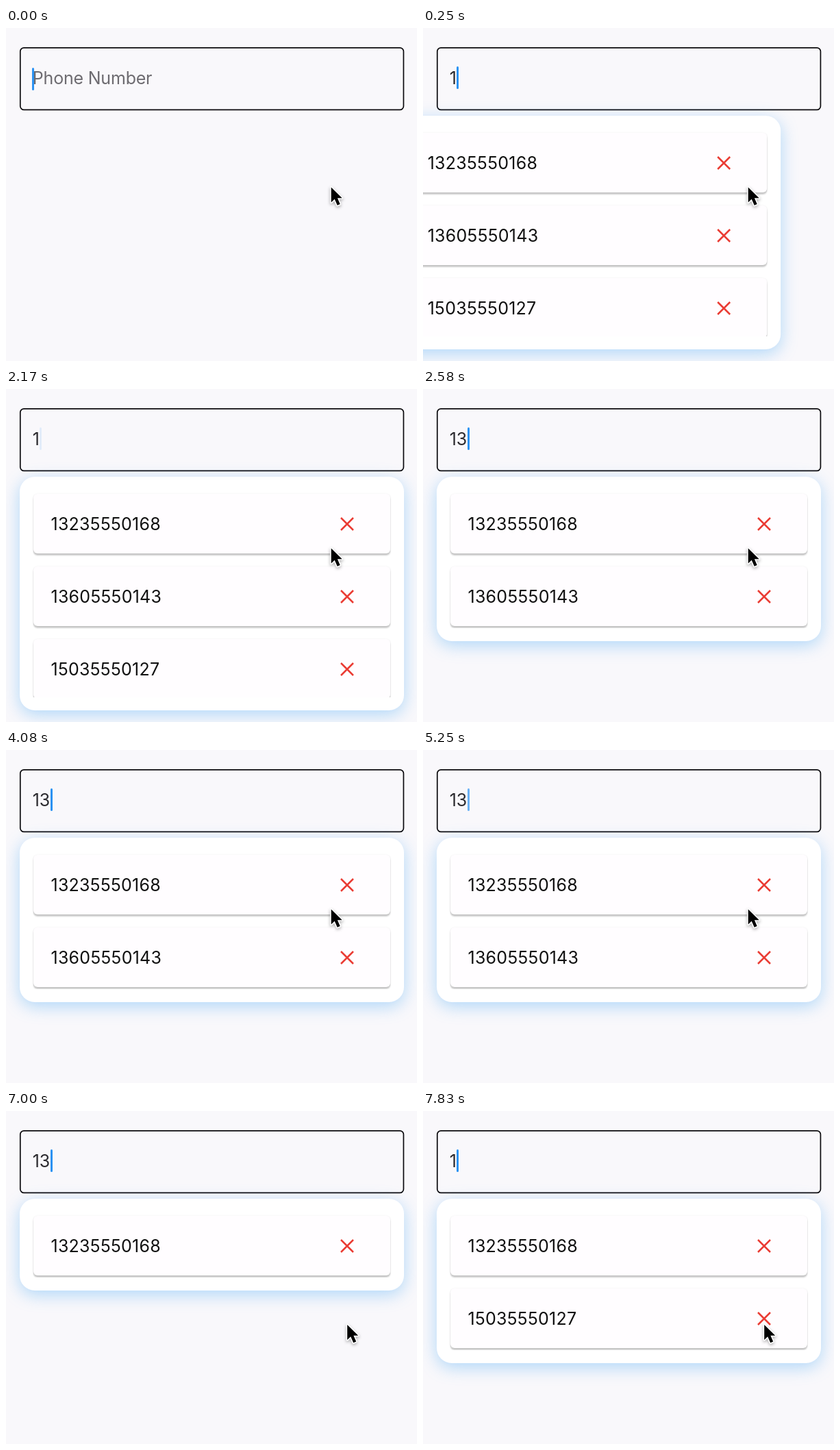
Recreate the animation shown at these times as an HTML page. Size 600 by 486 pixels, loop 8 s.

```html
<!DOCTYPE html>
<html lang="en">
<head>
<meta charset="utf-8">
<title>Phone number suggestions</title>
<style>
  html, body { margin: 0; width: 100%; height: 100%; overflow: hidden; background: #f9f8fb; }
  body { position: relative; font: 25px/30px Inter, sans-serif; }
  body > *, .list, .card * { position: absolute; }
  svg { overflow: visible; }
  #text { left: 38.8px; top: 58px; white-space: pre; letter-spacing: -.2px; }
  #caret { width: 3px; height: 33px; border-radius: 1.5px; background: #2b92f2; }
  #panel {
    left: 20px; top: 128px; width: 561px; border-radius: 22px; background: #fff;
    box-shadow: 0 6px 24px rgba(66, 165, 245, .4);
  }
  .list { inset: 19px; overflow: hidden; }
  .card {
    position: relative; margin: 6px 1px 19px; height: 87px; border-radius: 6px;
    background: #fffdff; color: #111;
    box-shadow: 0 3px 2px rgba(0, 0, 0, .17), 0 1px 3px rgba(0, 0, 0, .14);
  }
  .card span { left: 25.5px; top: 29px; letter-spacing: .25px; }
  .card svg { left: 449px; top: 34.5px; }
  #mouse { left: 0; top: 0; filter: drop-shadow(0 2px 2px rgba(0, 0, 0, .3)); }
</style>
</head>
<body>
<svg width="600" height="486">
  <rect x="20.8" y="28.8" width="559.6" height="90.6" rx="5.5" fill="none" stroke="#0c0b0e" stroke-width="1.7"/>
</svg>
<div id="text"></div>
<div id="caret"></div>
<div id="panel"><div class="list"></div></div>
<svg id="mouse" width="17" height="27">
  <path d="M0 0V22L5 17.3 9 26.3 13 24.6 9.2 15.7H16Z" fill="#000" stroke="#fff" stroke-width="3.2" stroke-linejoin="round" paint-order="stroke"/>
</svg>
<script>
const LOOP = 8000, STEP = 1000 / 12;
const numbers = ['13235550168', '13605550143', '15035550127'];
const DELETE_AT = 6740, deleted = numbers[1];

// Each edit restarts the caret blink; blink = when it first starts to fade.
const edits = [
  { at: 0, text: '', blink: 650 },
  { at: 70, text: '1', blink: 650 },
  { at: 2490, text: '13', blink: 3200 },
  { at: 7570, text: '1', blink: 8220 },
];
const mousePath = [[6130, 474.7, 232.5], [6540, 500.2, 312], [6600, 500.2, 312], [6720, 498.2, 312]];

const $ = id => document.getElementById(id);
const clamp = v => Math.min(1, Math.max(0, v));

function cubic(x1, y1, x2, y2) {
  const at = (a, b, s) => 3 * s * (1 - s) ** 2 * a + 3 * s * s * (1 - s) * b + s ** 3;
  return x => {
    let low = 0, high = 1;
    for (let i = 0; i < 24; i++) {
      const mid = (low + high) / 2;
      if (at(x1, x2, mid) < x) low = mid; else high = mid;
    }
    return at(y1, y2, high);
  };
}
const easeOut = cubic(0, 0, .58, 1);
const easeInOut = cubic(.42, 0, .58, 1);
const fastOutSlowIn = cubic(.4, 0, .2, 1);

const cards = numbers.map(number => {
  const card = document.createElement('div');
  card.className = 'card';
  card.innerHTML = `<span>${number}</span><svg width="18" height="18">
    <path d="M0 0L18 18M18 0L0 18" stroke="#ea3c34" stroke-width="2.5"/></svg>`;
  document.querySelector('.list').append(card);
  return card;
});

function caretOpacity(t, blink) {
  if (t < blink) return 1;
  const fade = easeOut(clamp((t - blink) % 500 / 250));
  return Math.floor((t - blink) / 500) % 2 ? fade : 1 - fade;
}

function mouseAt(t) {
  let [, x, y] = mousePath[0];
  for (let i = 1; i < mousePath.length; i++) {
    const [t0, x0, y0] = mousePath[i - 1], [t1, x1, y1] = mousePath[i];
    if (t < t0) break;
    const k = easeInOut(clamp((t - t0) / (t1 - t0)));
    x = x0 + (x1 - x0) * k;
    y = y0 + (y1 - y0) * k;
  }
  return [x, y];
}

function draw(t) {
  const { text, blink } = edits.findLast(edit => edit.at <= t);
  $('text').textContent = text || 'Phone Number';
  $('text').style.color = text ? '#2b2a2e' : '#6d6b70';

  const caretX = { '': 37.5, '1': 49, '13': 65 }[text];
  $('caret').style.cssText = `left:${caretX}px;top:${text ? 56 : 58}px;opacity:${caretOpacity(t, blink)}`;

  let count = 0;
  numbers.forEach((number, i) => {
    const shown = number.startsWith(text) && !(number === deleted && t >= DELETE_AT);
    cards[i].style.display = shown ? '' : 'none';
    count += shown;
  });
  const slide = fastOutSlowIn(clamp(.25 + (t - 62) / 500)) - 1;
  const panel = $('panel').style;
  panel.display = text ? '' : 'none';
  panel.height = Math.min(341, 28 + 106 * count) + 'px';
  panel.transform = `translateX(${slide * 561}px)`;

  const [x, y] = mouseAt(t);
  $('mouse').style.transform = `translate(${x}px, ${y}px)`;
}

// The motion advances at twelve pictures a second.
function tick() {
  const t = performance.now() % LOOP;
  draw(Math.floor((t + 8) / STEP) * STEP);
  requestAnimationFrame(tick);
}
tick();
</script>
</body>
</html>
```
